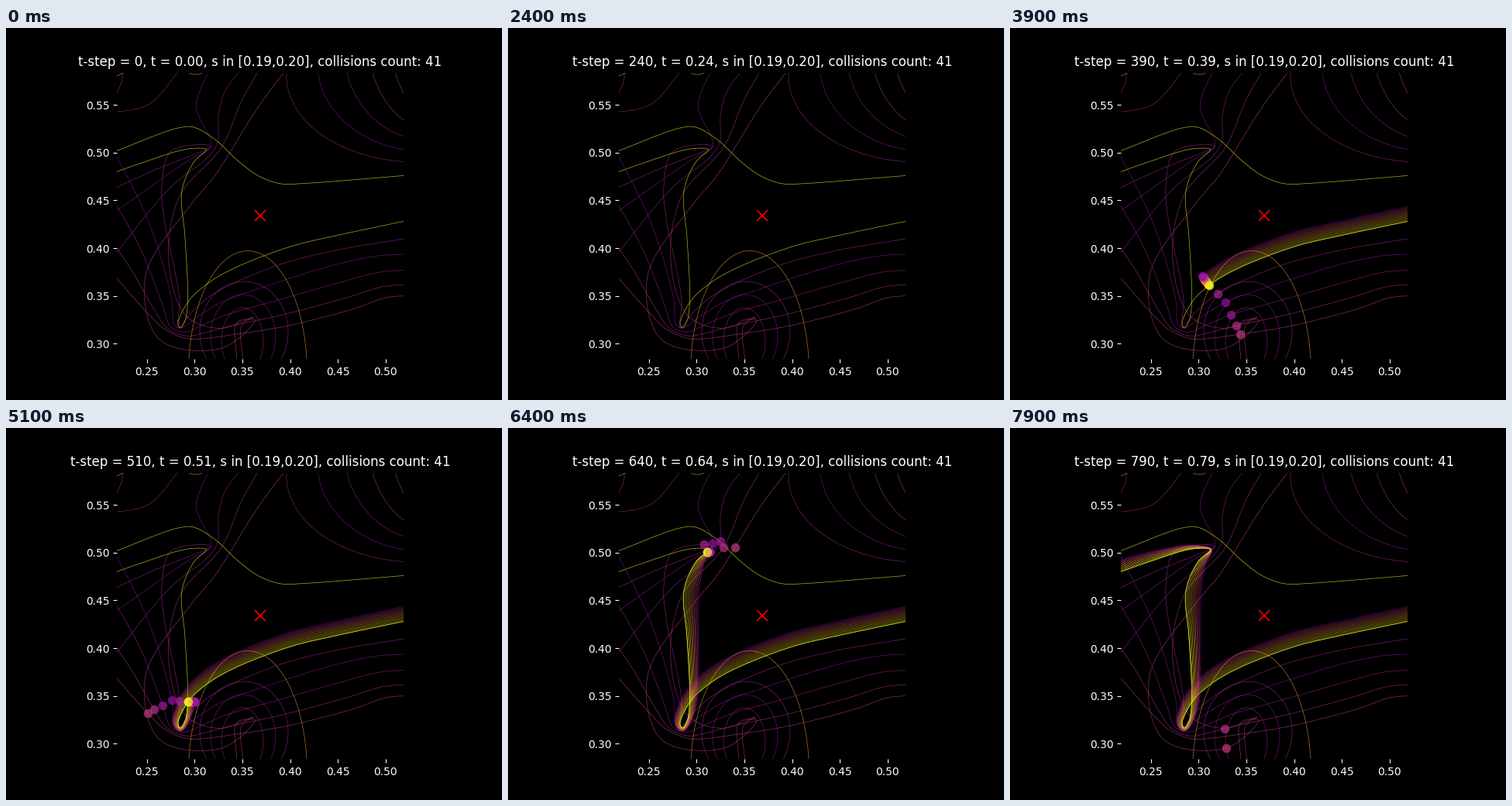
A matplotlib script for the animation above (8000 ms loop, 640x480 px).

```python
import numpy as np
import matplotlib.pyplot as plt
from matplotlib.animation import FuncAnimation

FRAMES, STEP = 80, 100
SCALE = 1232.0                      # pixels per data unit
X0, Y0 = 0.21874, 0.28384           # lower left corner of the view
SUB = 16                            # samples per spline segment
CMAP = plt.get_cmap("plasma")
TONES = MAG, VIOLET, PLUM, PINK, ROSE = 0.38, 0.31, 0.35, 0.42, 0.46
ORANGE, YELLOW = 0.76, 1.0


def to_data(p):
    """Stage pixels to axis units."""
    p = np.asarray(p, float)
    return X0 + (p[..., 0] - 143.2) / SCALE, Y0 + (427.2 - p[..., 1]) / SCALE


def hermite(u, v, at):
    """Smooth curve through the values v at the knots u."""
    m = np.gradient(v, u, axis=0)
    i = np.clip(np.searchsorted(u, at, side="right") - 1, 0, len(u) - 2)
    h = u[i + 1] - u[i]
    s = (at - u[i]) / h
    if v.ndim > 1:
        s, h = s[:, None], h[:, None]
    return ((1 + 2 * s) * (1 - s) ** 2 * v[i] + s * (1 - s) ** 2 * h * m[i]
            + s * s * (3 - 2 * s) * v[i + 1] + s * s * (s - 1) * h * m[i + 1])


def spline(knots):
    """Sampled curve; columns after x and y are carried along."""
    knots = np.asarray(knots, float)
    gap = np.sqrt(np.hypot(*np.diff(knots[:, :2], axis=0).T))
    u = np.r_[0, np.cumsum(gap)]
    n = len(u)
    at = np.interp(np.arange((n - 1) * SUB + 1) / SUB, np.arange(n), u)
    return hermite(u, knots, at)


class Runner:
    """A dot moving along a curve, paced by keys (time, knot)."""

    def __init__(self, pts, keys):
        self.pts = pts
        self.arc = np.r_[0, np.cumsum(np.hypot(*np.diff(pts, axis=0).T))]
        self.times = np.array([t for t, _ in keys], float)
        self.marks = np.array([self.arc[k * SUB] for _, k in keys])

    def trail(self, t):
        if t < self.times[0]:
            return np.empty((0, 2))
        t = np.array([min(t, self.times[-1])])
        s = hermite(self.times, self.marks, t)[0]
        tip = [np.interp(s, self.arc, c) for c in self.pts.T]
        return np.vstack([self.pts[self.arc < s], tip])


fig, ax = plt.subplots(figsize=(6.4, 4.8), dpi=100, facecolor="black")
ax.set_facecolor("black")
ax.set_aspect("equal")
ax.set(xlim=(X0, X0 + 0.3), ylim=(Y0, Y0 + 0.3))
ax.tick_params(colors="white")
for spine in ax.spines.values():
    spine.set_visible(False)
title = ax.set_title("", color="white")
movers = []


def line(pts, tone, alpha=0.7, z=1):
    return ax.plot(*to_data(pts), color=CMAP(tone), lw=0.5, alpha=alpha, zorder=z)[0]


def marker(tone, z=4):
    return ax.plot([], [], "o", color=CMAP(tone), ms=8.3, mew=0, alpha=0.7, zorder=z)[0]


def ellipse(cx, cy, rx, ry, tone):
    a = np.linspace(0, 2 * np.pi, 200)
    line(np.c_[cx + rx * np.cos(a), cy + ry * np.sin(a)], tone)


def orbit(tone, knots, keys=()):
    """Faint line, with a dot on it if some knots (x, y, ms) or keys are timed."""
    keys = keys or [(k[2], i) for i, k in enumerate(knots) if len(k) > 2]
    pts = spline([k[:2] for k in knots])
    line(pts, tone)
    if keys:
        movers.append((Runner(pts, keys), marker(tone)))


# From the right, turning up along the bundle
orbit(MAG, [(525, 270, 2420), (420, 288, 2850), (345, 308), (268, 343, 3900), (240, 366),
            (222, 387, 4560), (224, 352, 5100), (204, 245), (201, 205, 5800), (212, 160),
            (255, 150.5), (264, 153, 6480), (225, 170), (190, 184, 7000), (125, 214, 7480)])

# From the right and out at the left: four lines blended between two guides
near = np.array([(525, 291.5), (480, 294), (430, 304), (345, 330), (278, 354), (245, 374),
                 (226, 387), (217, 383), (214, 351), (184, 250), (125, 132)])
far = np.array([(525, 345), (490, 348), (450, 362), (360, 385), (297, 395), (262, 400),
                (235, 401), (205, 389), (183, 368), (155, 337), (120, 297)])
for j, tone in enumerate(TONES[1:]):
    w = 1 - (1 - j / 3) ** 1.2
    orbit(tone, near + (far - near) * w,
          [(2420, 0), (2820, 2), (3900, 4), (4520, 6), (5100, 8), (6210 - 730 * w, 10)])

# From the top
orbit(MAG, [(238, 36, 5620), (221, 58, 5800), (185, 98), (144, 108), (125, 107, 6450)])
orbit(VIOLET, [(275, 35, 5480), (253, 74, 5800), (245.5, 103), (264, 145), (263, 155, 6450),
               (240, 168), (199, 196, 7000), (120, 252, 7500)])
orbit(PLUM, [(310, 45, 5420), (282, 83, 5800), (274, 115), (274, 145), (262, 165),
             (211, 207, 7000), (125, 312, 7550)])
orbit(PINK, [(335, 40, 5380), (305, 92, 5800), (278, 154), (224, 217, 7000), (210, 300),
             (232, 371), (277, 387.5, 7900), (319, 373), (304, 384), (306, 432)])
orbit(ROSE, [(375, 36, 5250), (326, 101, 5800), (270, 190), (240, 226, 7000), (180, 320),
             (198, 402), (279, 413, 7900), (321, 377), (298, 380), (298, 432)])

# Nested curves: upper right corner, lower centre, large arch
for k, tone in enumerate(TONES):
    ellipse(530 + 10 * k, 62 - 15 * k, 168 * 0.82 ** k, 111 + 0.8 * k * k, tone)
for k in range(3):
    ellipse(307 - k, 392 + 6 * k, 57 - 15 * k, 65 - 11 * k, TONES[k])
ellipse(312, 445, 76.5, 157.5, ORANGE)

# Upper edge
orbit(YELLOW, [(125, 165), (144, 158), (222, 129), (242, 128), (270, 144), (300, 172),
               (328, 192), (355, 201), (385, 200.5), (530, 189)])
orbit(PINK, [(150, 50), (149, 70), (138, 92)])
orbit(ORANGE, [(140, 63.5), (160, 54)])
ellipse(244.5, 54, 11, 6, ORANGE)

# Bundle: its edge as (x, y, width); strands are spread along the normal
edge = spline([(525, 247, 19), (430, 267, 18), (367, 282, 18), (290, 312, 17),
               (257, 332, 15.4), (236, 352, 12), (222, 381, 7), (225, 387, 4.5),
               (231, 378, 5), (234.5, 353, 9.5), (231, 270, 15), (227, 210, 20),
               (243, 172, 11), (258.5, 157, 2), (235, 156, 5), (181, 172, 12),
               (125, 192, 16)])
KEYS = [(2420, 0), (2900, 1), (3900, 4), (4580, 7), (5100, 9), (5800, 11),
        (6430, 13), (7000, 15), (7480, 16)]
base, width = edge[:, :2], edge[:, 2:]
tangent = np.gradient(base, axis=0)
tangent /= np.hypot(*tangent.T)[:, None]
side = np.c_[-tangent[:, 1], tangent[:, 0]] * width
line(base, YELLOW)

strands = []
for k in range(11):
    tone = 1 - 0.7 * (k / 10) ** 1.5
    z = {0: 7, 10: 6}.get(k, 5)
    strands.append((Runner(base + side * k / 10, KEYS),
                    line(base[:1], tone, 0.9 if k == 0 else 0.65, 2), marker(tone, z)))

ax.plot(X0 + 0.15, Y0 + 0.15, "x", color="red", ms=10, mew=1.5, alpha=0.8, zorder=3)


def draw(i):
    t = i * STEP
    title.set_text(f"t-step = {i * 10}, t = {i / 100:.2f}, "
                   "s in [0.19,0.20], collisions count: 41")
    for runner, dot in movers:
        dot.set_data(*to_data(runner.trail(t)[-1:]))
    for runner, trail, dot in strands:
        path = runner.trail(t)
        trail.set_data(*to_data(path))
        dot.set_data(*to_data(path[-1:]))
    return []


anim = FuncAnimation(fig, draw, frames=FRAMES, interval=STEP, repeat=True, repeat_delay=0)
plt.show()
```
